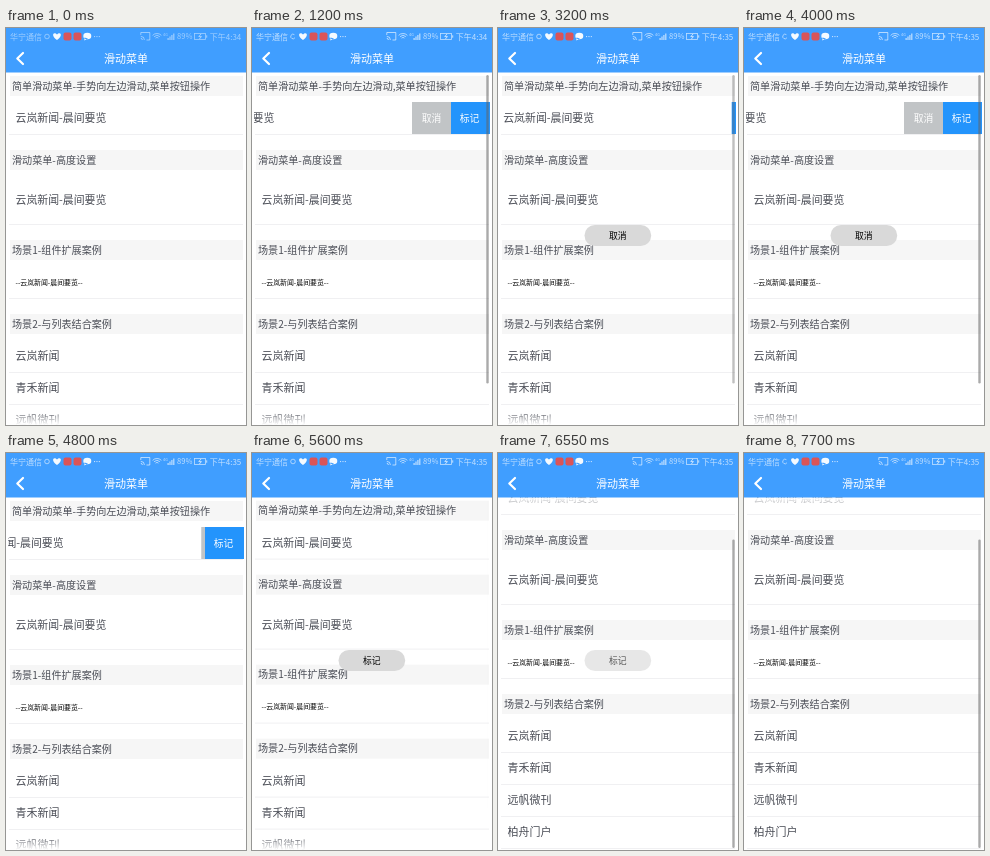
These frames come from a looping animation (240x397 px, 8 s). An HTML page with a canvas:

```html
<!DOCTYPE html>
<html lang="zh-CN">
<head>
<meta charset="utf-8">
<title>滑动菜单</title>
<style>
html, body { margin: 0; width: 100%; height: 100%; overflow: hidden; background: #fff; }
canvas { display: block; width: 240px; height: 397px; }
</style>
</head>
<body>
<canvas id="stage"></canvas>
<script>
const W = 240, H = 397, LOOP = 8000;
const HEAD = 44.5, VIEW = 352, MAX_SCROLL = 45, MENU = 78, FADE = 14;
const FONT = '"Noto Sans CJK SC", "Noto Sans CJK", "Noto Sans", sans-serif';
const BLUE = '#409eff', INK = '#4a4d56';

const canvas = document.getElementById('stage');
const ctx = canvas.getContext('2d');
const ratio = window.devicePixelRatio || 1;
canvas.width = W * ratio;
canvas.height = H * ratio;

const ramp = (t, a, b) => Math.min(1, Math.max(0, (t - a) / (b - a)));
const smooth = p => p * p * (3 - 2 * p);
const between = (t, a, b) => t >= a && t < b;
// Visible from a to d, fading in until b and out from c
const pulse = (t, a, b, c, d) => ramp(t, a, b) * (1 - ramp(t, c, d));

function text(str, x, y, size, color, align = 'left', weight = 500) {
  ctx.font = `${weight} ${size}px ${FONT}`;
  ctx.textAlign = align;
  ctx.textBaseline = 'alphabetic';
  ctx.fillStyle = color;
  ctx.fillText(str, x, y + size * 0.38);
}

function rect(x, y, w, h, color) {
  ctx.fillStyle = color;
  ctx.fillRect(x, y, w, h);
}

function pill(x, y, w, h, r, color) {
  ctx.beginPath();
  ctx.roundRect(x, y, w, h, r);
  ctx.fillStyle = color;
  ctx.fill();
}

function stroke(points, width, color = '#fff') {
  ctx.beginPath();
  points.forEach(([x, y], i) => i ? ctx.lineTo(x, y) : ctx.moveTo(x, y));
  ctx.lineWidth = width;
  ctx.strokeStyle = color;
  ctx.stroke();
}

function arc(x, y, r, from, to, width) {
  ctx.beginPath();
  ctx.arc(x, y, r, from, to);
  ctx.lineWidth = width;
  ctx.strokeStyle = '#fff';
  ctx.stroke();
}

function menuOpen(t) {
  const swing = (open, shut) =>
    smooth(ramp(t, open, open + 850)) * (1 - smooth(ramp(t, shut, shut + 580) ** 1.7));
  return t < 3000 ? swing(50, 1800) : swing(3080, 4430);
}

const scrollAt = t => MAX_SCROLL * smooth(ramp(t, 5580, 5970));

const barAlpha = t => Math.max(
  pulse(t, 50, 200, 1300, 1600),
  pulse(t, 3090, 3240, 4020, 4230),
  pulse(t, 5600, 5700, 6880, 7320),
  t >= 7690 ? 1 : 0
);

function section(y, label) {
  rect(4, y - 10, 233, 20, '#f6f6f6');
  text(label, 6, y, 10.1, INK);
}

function line(y) {
  rect(3, y, 234, 1, '#f0f0f2');
}

function swipeRow(t) {
  const shift = MENU * menuOpen(t);
  ctx.save();
  ctx.beginPath();
  ctx.rect(2, 74, 236, 32);
  ctx.clip();
  if (shift > 0.05) {
    rect(160, 74, 39, 32, '#c1c4c6');
    rect(199, 74, 39, 32, '#2394fc');
    text('取消', 179.5, 90, 9.8, '#fff', 'center');
    text('标记', 217.5, 90, 9.8, '#fff', 'center');
  }
  rect(2 - shift, 74, 236, 32, '#fff');
  text('云岚新闻-晨间要览', 9.5 - shift, 90, 10.9, INK);
  ctx.restore();
  line(106);
}

// White fade over the content at a clipped edge
function edgeFade(edge, inner) {
  const shade = ctx.createLinearGradient(0, edge, 0, inner);
  shade.addColorStop(0, 'rgba(255,255,255,1)');
  shade.addColorStop(1, 'rgba(255,255,255,0)');
  rect(0, Math.min(edge, inner), W, Math.abs(inner - edge), shade);
}

function page(t) {
  const scroll = scrollAt(t);
  ctx.save();
  ctx.translate(0, -scroll);
  section(58, '简单滑动菜单-手势向左边滑动,菜单按钮操作');
  swipeRow(t);
  section(132, '滑动菜单-高度设置');
  text('云岚新闻-晨间要览', 9.5, 172, 10.9, INK);
  line(196);
  section(222, '场景1-组件扩展案例');
  text('--云岚新闻-晨间要览--', 9.5, 254, 6.9, '#000');
  line(270);
  section(296, '场景2-与列表结合案例');
  ['云岚新闻', '青禾新闻', '远帆微刊', '柏舟门户'].forEach((name, i) => {
    text(name, 9.5, 328 + 32 * i, 11, INK);
    line(344 + 32 * i);
  });
  ctx.restore();

  const above = Math.min(FADE, scroll), below = Math.min(FADE, MAX_SCROLL - scroll);
  if (above) edgeFade(HEAD, HEAD + above);
  if (below) edgeFade(H, H - below);
}

function scrollBar(t) {
  const track = VIEW - 4, scale = track / (VIEW + MAX_SCROLL);
  ctx.globalAlpha = barAlpha(t);
  pill(234.3, 47 + scrollAt(t) * scale, 2.4, VIEW * scale, 1.2, 'rgba(100,100,100,.55)');
  ctx.globalAlpha = 1;
}

function castIcon() {
  stroke([[134.8, 7], [134.8, 4.5], [143.8, 4.5], [143.8, 12], [140.5, 12]], 0.9);
  arc(134.8, 12, 1.6, -Math.PI / 2, 0, 0.9);
  arc(134.8, 12, 3.6, -Math.PI / 2, 0, 0.9);
}

function statusBar(t) {
  const soft = 0.5 + 0.18 * ramp(t, 50, 400);
  ctx.globalAlpha = soft;
  text('华宁通信', 4, 8.5, 8, '#fff');
  const busy = between(t, 900, 1600) || between(t, 3500, 4400) || t >= 7450;
  arc(41, 8.5, 2.3, busy ? 0.5 : 0, busy ? 5.4 : Math.PI * 2, 0.8);

  ctx.globalAlpha = 0.95;
  ctx.beginPath();
  ctx.moveTo(51, 12);
  ctx.bezierCurveTo(44, 7, 48, 3, 51, 6.5);
  ctx.bezierCurveTo(54, 3, 58, 7, 51, 12);
  ctx.fillStyle = '#fff';
  ctx.fill();
  pill(57.5, 4.5, 8, 8, 2, '#e4504f');
  pill(67.5, 4.5, 8, 8, 2, '#e4504f');
  ctx.beginPath();
  ctx.ellipse(81.3, 8, 4, 3.3, 0, 0, Math.PI * 2);
  ctx.moveTo(78.5, 9.5);
  ctx.lineTo(78.3, 12.5);
  ctx.lineTo(82, 10.5);
  ctx.fillStyle = '#fff';
  ctx.fill();

  ctx.globalAlpha = soft;
  for (let i = 0; i < 3; i++) rect(88 + i * 2.4, 8, 1.1, 1.1, '#fff');
  castIcon();
  for (let i = 1; i <= 3; i++) arc(151, 11.5, i * 2, -Math.PI * 0.76, -Math.PI * 0.24, 0.9);
  text('4G', 157, 6, 4, '#fff');
  for (let i = 0; i < 4; i++) rect(161.5 + i * 1.9, 10 - i * 1.5, 1.2, 2 + i * 1.5, '#fff');
  text('89%', 171, 8.5, 7.6, '#fff');
  ctx.lineWidth = 0.8;
  ctx.strokeRect(188.5, 5.5, 11, 6);
  rect(200.2, 7.3, 1, 2.4, '#fff');
  stroke([[195, 6], [192.8, 8.6], [195.4, 8.6], [193.4, 11]], 1);
  text(t < 1400 ? '下午4:34' : '下午4:35', 235.3, 8.5, 8, '#fff', 'right');
  ctx.globalAlpha = 1;
}

function header(t) {
  rect(0, 0, W, HEAD, BLUE);
  statusBar(t);
  ctx.lineCap = ctx.lineJoin = 'round';
  stroke([[17, 25], [11.3, 30.5], [17, 36]], 2.2);
  ctx.lineCap = 'butt';
  ctx.lineJoin = 'miter';
  text('滑动菜单', 120, 30.5, 11, '#fff', 'center');
}

function toast(label, alpha) {
  if (!alpha) return;
  ctx.globalAlpha = alpha;
  pill(86.5, 197, 66.7, 21, 10.5, '#d9d9d9');
  text(label, 119.8, 207.8, 8.8, '#000', 'center');
  ctx.globalAlpha = 1;
}

function draw(t) {
  ctx.setTransform(ratio, 0, 0, ratio, 0, 0);
  rect(0, 0, W, H, '#fff');
  page(t);
  scrollBar(t);
  header(t);
  toast('取消', pulse(t, 2630, 2860, 4500, 4700));
  toast('标记', pulse(t, 5180, 5430, 6480, 6670));
}

const start = performance.now();
function tick() {
  draw((performance.now() - start) % LOOP);
  requestAnimationFrame(tick);
}
tick();
</script>
</body>
</html>
```
